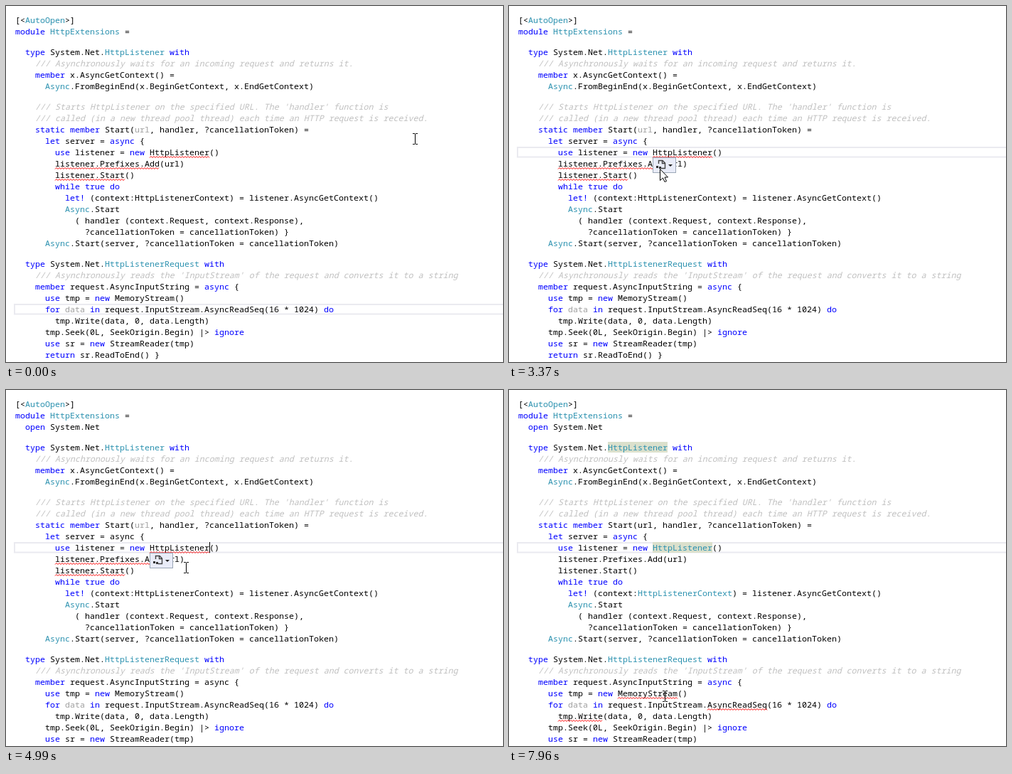
Write an HTML page with a canvas that moves like this. It is 699 by 501 pixels and loops after 8000 ms.

```html
<!DOCTYPE html>
<html>
<head>
<meta charset="utf-8">
<style>
html, body { margin: 0; width: 100%; height: 100%; overflow: hidden; background: #fff; }
canvas { display: block; }
</style>
</head>
<body>
<canvas id="stage" width="699" height="501"></canvas>
<script>
const g = document.getElementById('stage').getContext('2d');
const LOOP = 8000, COL = 7, LEFT = 13;
const MONO = '11.667px "Noto Sans Mono", monospace';
const SANS = '11.4px "Open Sans", sans-serif';
const BLUE = '#0000ff', TEAL = '#2b91af';

const CODE = `[<AutoOpen>]
module HttpExtensions =

  type System.Net.HttpListener with
    /// Asynchronously waits for an incoming request and returns it.
    member x.AsyncGetContext() =
      Async.FromBeginEnd(x.BeginGetContext, x.EndGetContext)

    /// Starts HttpListener on the specified URL. The 'handler' function is
    /// called (in a new thread pool thread) each time an HTTP request is received.
    static member Start(url, handler, ?cancellationToken) =
      let server = async {
        use listener = new HttpListener()
        listener.Prefixes.Add(url)
        listener.Start()
        while true do
          let! (context:HttpListenerContext) = listener.AsyncGetContext()
          Async.Start
            ( handler (context.Request, context.Response),
              ?cancellationToken = cancellationToken) }
      Async.Start(server, ?cancellationToken = cancellationToken)

  type System.Net.HttpListenerRequest with
    /// Asynchronously reads the 'InputStream' of the request and converts it to a string
    member request.AsyncInputString = async {
      use tmp = new MemoryStream()
      for data in request.InputStream.AsyncReadSeq(16 * 1024) do
        tmp.Write(data, 0, data.Length)
      tmp.Seek(0L, SeekOrigin.Begin) |> ignore
      use sr = new StreamReader(tmp)
      return sr.ReadToEnd() }`.split('\n');
const OPENED = [...CODE.slice(0, 2), '  open System.Net', ...CODE.slice(2)];

const KEYWORD = /^(module|open|type|with|member|static|let!?|use|new|while|true|do|for|in|ignore|return|async)$/;
const TYPE = /^(AutoOpen|HttpExtensions|Async|HttpListenerRequest)$/;
const UNRESOLVED = /HttpListener(?=\(\))|listener\.Prefixes\.Add|listener\.Start/;
const UNRESOLVED_LATER = /MemoryStream|AsyncReadSeq|tmp\.Write/;

// pointer steps: time, shape (I-beam, Arrow, - hidden), x, y
const POINTER = [
  [0, 'I', 575, 187], [430, 'I', 515, 185], [550, 'I', 435, 181], [670, 'I', 363, 178],
  [820, 'I', 290, 196], [940, 'I', 245, 217], [1090, 'I', 253, 222], [1240, 'I', 258, 217],
  [1360, 'I', 260, 213], [1510, 'I', 258, 210], [1760, 'I', 258, 209], [2320, 'I', 230, 206],
  [2470, 'I', 222, 205], [2620, 'I', 217, 206], [2740, 'I', 213, 208], [2860, 'I', 212, 210],
  [3010, 'A', 210, 216], [3130, 'A', 211, 222], [3250, 'A', 212, 227], [3370, 'A', 212, 229],
  [3890, 'A', 228, 237], [4010, 'A', 243, 245], [4130, 'A', 252, 249], [4840, 'I', 253, 250],
  [5540, '-', 0, 0], [5690, 'I', 260, 256], [5840, 'I', 261, 259], [5960, 'I', 262, 262],
  [6910, 'I', 262, 266], [7030, 'I', 262, 272], [7180, 'I', 260, 295], [7300, 'I', 258, 325],
  [7420, 'I', 256, 350], [7570, 'I', 238, 385], [7690, 'I', 220, 413], [7840, 'I', 219, 424],
  [7960, 'I', 219, 431]
];
const CARET = [[1760, 2320], [2860, 3370], [4840, 5840], [6330, 6910], [7420, 7960]];

const within = (t, a, b) => t >= a && t < b;

function box(x, y, w, h, fill, edge) {
  g.fillStyle = edge;
  g.fillRect(x, y, w, h);
  g.fillStyle = fill;
  g.fillRect(x + 1, y + 1, w - 2, h - 2);
}

function label(text, x, y, color = '#1e1e1e', font = SANS) {
  g.font = font;
  g.fillStyle = color;
  g.fillText(text, x, y);
}

function path(points, close) {
  g.beginPath();
  for (let i = 0; i < points.length; i += 2) g.lineTo(points[i], points[i + 1]);
  if (close) g.closePath();
}

function squiggle(x, top, width) {
  const pts = [];
  for (let i = 0; i <= width; i += 2) pts.push(x + i, top + (i % 4 ? 13.5 : 15.5));
  path(pts);
  g.strokeStyle = '#f00';
  g.lineWidth = 1;
  g.stroke();
}

function tokenColor(word, line, at, t) {
  const before = line.slice(0, at), resolved = t >= 5270;
  if (word === 'async' && within(t, 4990, 5690)) return '#000';
  if (KEYWORD.test(word)) return BLUE;
  if (TYPE.test(word)) return TEAL;
  if (word === 'HttpListener' && (resolved || before.endsWith('Net.'))) return TEAL;
  if (word === 'HttpListenerContext' && resolved) return TEAL;
  if (word === 'data' && before.endsWith('for ')) return '#a0a0a0';
  if (word === 'url' && before.endsWith('Start(') && !resolved) return '#a0a0a0';
  return '#000';
}

function drawLine(line, top, t) {
  const y = top + 12;
  if (line.includes('///')) {
    label(line.trim(), LEFT + COL * line.indexOf('/'), y, '#c0c0c0', 'italic ' + MONO);
    return;
  }
  if (t >= 5270) {
    const m = /HttpListener(?=\(\)| with)/.exec(line);
    if (m) {
      g.fillStyle = '#dbe0cc';
      g.fillRect(LEFT + COL * m.index, top, 12 * COL, 15);
    }
  }
  for (const m of line.matchAll(/\w+!?|[^\w\s]+/g))
    label(m[0], LEFT + COL * m.index, y, tokenColor(m[0], line, m.index, t), MONO);
  const bad = t < 6480 ? UNRESOLVED.exec(line) : t >= 6600 && UNRESOLVED_LATER.exec(line);
  if (bad) squiggle(LEFT + COL * bad.index, top, bad[0].length * COL);
}

function drawCode(t) {
  const current = t < 1760 ? 419 : t < 4990 ? 198 : 214;
  g.strokeStyle = '#eaeaf0';
  g.lineWidth = 2;
  g.strokeRect(12, current + 1, 700, 13.5);
  let top = 12;
  for (const line of t < 4990 ? CODE : OPENED) {
    if (line) drawLine(line, top, t);
    top += line ? 16 : 13;
  }
  if (CARET.some(([a, b]) => within(t, a, b))) {
    g.fillStyle = '#000';
    g.fillRect(t < 4990 ? 258 : 286, current, 1, 15);
  }
}

function drawTag(y) {
  box(202, y, 33, 22, '#e9ecf8', '#9ba7b7');
  g.strokeStyle = '#424242';
  g.lineWidth = 1.4;
  path([210.5, y + 9, 210.5, y + 4.5, 216, y + 4.5, 219.5, y + 8, 219.5, y + 15.5, 214, y + 15.5]);
  g.stroke();
  path([215.5, y + 4.5, 215.5, y + 8.5, 219.5, y + 8.5]);
  g.stroke();
  g.fillStyle = '#333';
  g.fillRect(207, y + 12, 3, 3);
  g.fillRect(211, y + 13, 3, 3);
  path([224, y + 10, 230, y + 10, 227, y + 13], true);
  g.fillStyle = '#1e1e1e';
  g.fill();
}

function drawMenu() {
  box(202, 234, 222, 53, '#e9eefc', '#9ba7b7');
  g.fillStyle = '#fdf4bf';
  g.fillRect(204, 236, 218, 23);
  g.fillStyle = '#bec3cb';
  g.fillRect(238, 260, 182, 1);
  g.fillStyle = '#388a34';
  g.fillRect(210, 243, 5, 1.5);
  g.fillRect(212, 241, 1.5, 5);
  label('{ }', 212, 254, '#424242', 'bold 11px "Open Sans", sans-serif');
  label('open System.Net', 239, 253);
  label('System.Net.HttpListener', 239, 278);
}

function drawPointer(t) {
  const [, shape, x, y] = POINTER.findLast(p => t >= p[0]);
  if (shape === 'I') {
    g.fillStyle = '#000';
    for (const dy of [-8, 7]) {
      g.fillRect(x - 3, y + dy, 3, 1);
      g.fillRect(x + 1, y + dy, 3, 1);
    }
    g.fillRect(x, y - 7, 1, 14);
  } else if (shape === 'A') {
    g.save();
    g.translate(x + .5, y + .5);
    path([0, 0, 0, 16, 4, 12.5, 6.5, 18, 9, 17, 6.5, 11.5, 11, 11.5], true);
    g.fillStyle = '#fff';
    g.strokeStyle = '#000';
    g.lineWidth = 1;
    g.fill();
    g.stroke();
    g.restore();
  }
}

function draw(t) {
  g.fillStyle = '#fff';
  g.fillRect(0, 0, 699, 501);
  drawCode(t);
  if (within(t, 1760, 3130)) {
    box(202, 213, 208, 30, '#e7e8ec', '#cccedb');
    label("The type 'HttpListener' is not defined", 209, 231);
  }
  if (within(t, 3130, 5540)) drawTag(t < 4990 ? 213 : 229);
  if (within(t, 3740, 4840)) drawMenu();
  drawPointer(t);
}

const start = performance.now();
function frame() {
  draw((performance.now() - start) % LOOP);
  requestAnimationFrame(frame);
}
frame();
</script>
</body>
</html>
```
